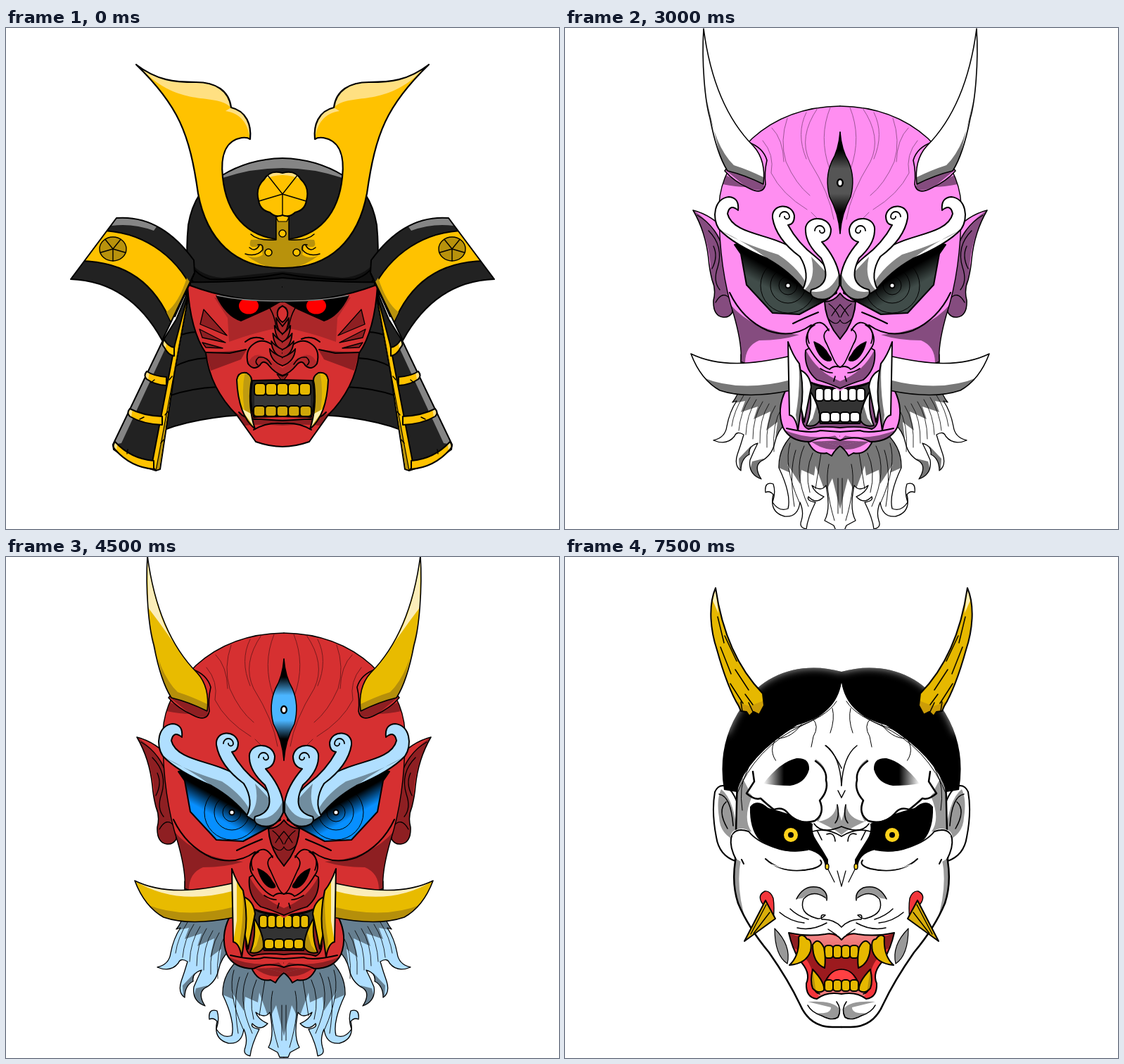
These frames come from a looping animation (786 by 712 pixels, 9 s). An HTML page:

```html
<!DOCTYPE html>
<html lang="en">
<head>
<meta charset="utf-8">
<title>Masks</title>
<style>
html, body { margin: 0; width: 100%; height: 100%; overflow: hidden; background: #fff; }
svg { display: block; width: 100vw; height: 100vh; }
.scene {
  opacity: 0; fill: none; stroke: #000; stroke-linejoin: round; stroke-linecap: round;
  animation: show 9s step-end infinite;
  animation-delay: calc(var(--i) * 1.5s - 9s);
}
@keyframes show { 0% { opacity: 1; } 16.66667%, 100% { opacity: 0; } }
</style>
</head>
<body>
<svg id="stage" viewBox="0 0 786 712"></svg>
<script>
const GOLD = '#ffc200', PALE = '#ffe082', BRONZE = '#b8920c', IRON = '#222', STEEL = '#858585';
const RED = '#d63031', WINE = '#8e1f22', TOOTH = '#e6b800';
let clips = 0;

// Drawing helpers: every left half is mirrored about x = 393, so halves stay open there.
const line = (d, w = 2, c = '#000') => `<path d="${d}" stroke="${c}" stroke-width="${w}"/>`;
const fill = (d, c) => `<path d="${d}" fill="${c}" stroke="none"/>`;
const solid = (d, c, w = 2) => `<path d="${d}" fill="${c}" stroke-width="${w}"/>`;
const oval = (x, y, rx, ry, c = 'none', w = 2) =>
  `<ellipse cx="${x}" cy="${y}" rx="${rx}" ry="${ry}" fill="${c}" stroke-width="${w}"/>`;
const move = (x, y, s) => `<g transform="translate(${x} ${y})">${s}</g>`;
const both = (...parts) => {
  const s = parts.join('');
  return s + `<g transform="matrix(-1 0 0 1 786 0)">${s}</g>`;
};
const shape = (d, c, inner, w = 2) => {
  const id = 'clip' + clips++;
  return `<clipPath id="${id}"><path d="${d}"/></clipPath>` + fill(d, c) +
    `<g clip-path="url(#${id})">${inner}</g>` + line(d, w);
};
const repeat = (n, draw) => Array.from({ length: n }, (_, i) => draw(i)).join('');
const teeth = (n, x, y, w, h, c) => repeat(n, i =>
  `<rect x="${x + i * w}" y="${y}" width="${w}" height="${h}" rx="4.5" fill="${c}" stroke-width="2"/>`);
const leaf = (x, y, deg, len, w) => `<g transform="translate(${x} ${y}) rotate(${deg})">` +
  solid(`M0 0Q${len * .3} ${-w} ${len} 0Q${len * .55} ${w} 0 0`, GOLD, 1.6) +
  fill(`M1 1Q${len * .5} ${w * .2} ${len} 0Q${len * .55} ${w} 1 1`, '#d59f08') + '</g>';
const spiral = (x, y, r, sweep = 1) => {
  const arc = (k, s) => `a${r * k} ${r * k} 0 0 ${sweep} ${2 * r * k * s} 0`;
  return line(`M${x} ${y}${arc(.35, 1)}${arc(.7, -1)}`, 1.8);
};
const spokes = (x, y, rx, ry, n, start) => line(repeat(n, i => {
  const a = (start + i * 360 / n) * Math.PI / 180;
  return `M${x} ${y}l${rx * Math.cos(a)} ${ry * Math.sin(a)}`;
}), 1.4);
const fade = (id, [x1, y1, x2, y2], ...stops) =>
  `<linearGradient id="${id}" gradientUnits="userSpaceOnUse" x1="${x1}" y1="${y1}" x2="${x2}" y2="${y2}">` +
  stops.map(([at, c]) => `<stop offset="${at}" stop-color="${c}"/>`).join('') + '</linearGradient>';

// Samurai parts
const bar = (x, y, w, h) => shape(
  `M${x} ${y}q-5 6 0 11q${w * .4} ${h * .9} ${w} ${h}v-12q${-w * .6} ${-h * .1} ${-w} ${1 - h}`, GOLD,
  fill(`M${x - 4} ${y}h8l-2 12h-6Z`, PALE));

const neckGuard = () => both(
  solid('M393 366H258L225 571Q290 547 393 549', IRON),
  line('M240 440Q256 432 272 432M236 483Q258 470 286 469M231 523Q262 512 302 510'),
  shape('M242 414L222 446L152 592L153 599Q180 620 213 629L262 366Z', IRON,
    fill('M222 446L152 592L164 590L229 450Z', STEEL)),
  solid('M262 366L240 450L207 622L213 629L219 627L241 480Z', GOLD),
  fill('M262 370L213 628L218 626L240 480Z', BRONZE),
  line('M262 368L213 629', 1.2),
  bar(225, 443, 14, 12), bar(200, 488, 28, 9), bar(176, 541, 46, 12), bar(155, 588, 55, 28),
  line('M206 504l5-4M190 556l6-3M172 605l1-6M232 500l4-5M226 550l4-5M220 590l4-5', 1.4));

const samuraiFace = () => both(
  shape('M393 366H258Q262 430 284 462Q290 512 328 550L355 588Q375 595 393 595', RED,
    fill('M296 383L393 380V425Q355 432 317 446L315 412Z', '#ab2729') +
    fill('M284 462L342 457L334 471L291 487Z', WINE) +
    fill('M324 545Q345 560 393 556V565Q350 562 336 566Z', WINE)),
  solid('M281 400L314 437L276 421ZM275 428L312 447L279 440ZM279 447L308 455L284 454Z', WINE, 1.3),
  line('M284 461L318 462L341 457M340 446Q352 436 366 442M331 546Q340 557 362 556L393 558M352 571Q370 560 393 562'),
  fill('M298 380Q312 410 334 417L372 400L393 388V380Z', '#000'),
  `<ellipse cx="345" cy="395" rx="14" ry="11.5" fill="red" stroke="none"/>`,
  line('M375 398Q382 410 384 425', 1.5),
  shape('M393 494Q382 490 374 480Q366 470 361 479Q352 488 344 477Q339 458 352 449Q364 440 378 450L393 462', RED,
    fill('M344 477Q350 462 362 465Q376 470 393 484V498H344Z', '#b3282b')),
  line('M358 479Q352 474 359 468Q370 466 377 478', 1.6),
  repeat(5, i => {
    const y = 418 + i * 11, w = 8 + i * 2.3;
    return solid(`M393 ${y + 18}Q${393 - w} ${y + 12} ${392 - w} ${y - 6}Q${397 - w} ${y + 1} 393 ${y + 6}`, '#ab2729', 1.8);
  }),
  solid('M393 395Q384 399 386 409Q388 415 393 418', RED),
  solid('M393 495L385 492L393 503', WINE, 1.2),
  solid('M393 500L350 501Q345 530 352 553L393 552', IRON),
  fill('M393 522H353V537H393Z', '#383838')) +
  teeth(5, 353, 505, 16, 17, TOOTH) + teeth(5, 352, 537, 16.4, 15, '#d0a608') +
  both(shape('M328 500Q330 488 342 490Q352 496 348 506Q344 540 354 570Q330 550 328 500', TOOTH,
    fill('M340 488Q356 496 349 508Q341 540 356 572L344 562Q332 525 340 488', '#bf9b10') +
    fill('M333 540L348 548L356 572Z', '#fff0b0')));

const hornedHelmet = () => both(
  shape('M393 185Q345 186 306 210Q268 228 259 280Q256 312 258 340Q262 360 272 368H393', IRON,
    fill('M393 185Q345 186 306 207L308 213Q350 199 393 199Z', STEEL) +
    fill('M258 325Q270 352 308 355Q350 350 393 346V370H250Z', '#111')),
  line('M258 326Q266 350 290 357Q340 359 393 349'),
  solid('M393 355Q320 362 262 361V366Q320 388 393 389', IRON),
  line('M300 380Q342 389 393 388', 1.5, STEEL),
  shape('M393 341C325 342 285 300 273 235C261 150 245 110 185 52C215 75 240 77 270 77C298 77 317 89 320 113C342 118 349 138 347 158Q343 155 335 156C310 160 305 185 308 212C313 262 340 298 393 301', GOLD,
    fill('M185 52C215 75 240 77 270 77C298 77 317 89 320 113C298 92 255 112 205 70ZM320 113C342 118 349 138 347 158C344 136 334 121 312 118Z', PALE) +
    fill('M340 322Q354 330 365 322L362 309Q342 316 348 301L372 300H393V342Q365 342 340 322Z', BRONZE), 2.2),
  line('M340 321Q356 326 365 315Q366 306 358 308M346 312Q354 319 360 309M348 293Q358 303 384 301V268', 1.5),
  oval(373, 319, 5, 5, GOLD, 1.5)) +
  fill('M384 304V268H402V304Z', BRONZE) + line('M384 301V268M402 301V268', 1.5) +
  solid('M384 269L393 265L402 269L399 275H387Z', GOLD, 1.2) + oval(393, 292, 5, 5, GOLD, 1.5) +
  shape('M393 206Q411 201 419 215Q432 227 427 245Q425 259 411 262Q403 270 393 266Q383 270 375 262Q361 259 359 245Q354 227 367 215Q375 201 393 206Z', GOLD,
    fill('M365 216Q393 202 421 216V200H365Z', PALE) + spokes(393, 236, 37, 34, 5, 90));

const bandedShoulders = () => both(
  shape('M92 357L157 270Q220 265 267 330L268 348L222 444Q176 360 92 357Z', IRON,
    fill('M157 270Q190 269 215 281L210 288Q180 277 150 281Z', STEEL) +
    solid('M132 288C190 288 240 320 266 374L236 422C212 362 170 332 106 331Z', GOLD) +
    fill('M262 362L236 420L228 404Q246 390 257 355Z', BRONZE)),
  line('M268 348L240 410'),
  oval(152, 314, 19, 17, BRONZE, 1.4), spokes(152, 314, 19, 17, 5, 90));

const laurel = () => {
  const at = (t, a, b, c, d) => {
    const u = 1 - t;
    return [u * u * u * a + 3 * u * u * t * b + 3 * u * t * t * c + t * t * t * d,
      u * u * (b - a) + 2 * u * t * (c - b) + t * t * (d - c)];
  };
  return repeat(12, i => {
    const t = .08 + i * .076;
    const [x, dx] = at(t, 345, 262, 268, 345), [y, dy] = at(t, 250, 220, 72, 42);
    const deg = Math.atan2(dy, dx) * 180 / Math.PI;
    return leaf(x, y, deg - 46, 59 - i * 2.7, 15 - i * .6) + leaf(x, y, deg + 46, 42 - i * 1.6, 10 - i * .3);
  }) + leaf(343, 43, -9, 33, 10) +
    line('M345 250C262 220 268 72 345 42', 7) + line('M345 250C262 220 268 72 345 42', 4, GOLD);
};

const crownedHelmet = () => both(
  shape('M393 205Q370 202 346 212Q296 238 274 262Q254 290 256 345L262 385H393', IRON,
    fill('M256 340Q280 370 320 368L393 362V390H250Z', '#111')),
  shape('M393 369Q275 371 258 395L300 397Q325 408 393 409', IRON,
    fill('M393 395Q360 397 333 403Q360 410 393 410Z', STEEL)),
  line('M257 296Q290 317 393 321', 8), line('M257 296Q290 317 393 321', 5, GOLD),
  shape('M302 333Q334 348 362 347L376 333V363H350Q312 360 302 333', GOLD,
    fill('M302 333Q334 348 362 347L376 333V348L350 353Q320 350 302 333', BRONZE) +
    fill('M318 352Q340 360 376 357V362H345Z', PALE))) +
  solid('M384 321H402V364H384Z', BRONZE) + repeat(3, i => oval(393, 326 + i * 14, 4.5, 4.5, GOLD, 1.5)) +
  both([175, 165, 153, 140, 125, 108, 90].map((a, i) =>
    leaf(393, 247, a, [130, 118, 108, 91, 76, 65, 64][i], 16)).join(''), laurel()) +
  solid('M363 212Q376 201 393 189Q410 201 423 212L410 222H376Z', PALE) +
  `<circle cx="393" cy="182" r="37.5" stroke-width="15"/><circle cx="393" cy="182" r="37.5" stroke="${GOLD}" stroke-width="11"/>` +
  line('M358 166Q370 142 398 143', 2, PALE) +
  both(shape('M393 233Q380 226 371 236Q364 221 349 227Q335 233 339 247Q323 250 323 264Q326 276 340 276Q347 292 393 292', GOLD,
    fill('M335 272Q360 284 393 283V294H340Z', '#d59f08')),
  spiral(350, 240, 12), spiral(337, 262, 12), spiral(382, 244, 13, 0),
  line('M347 258Q365 246 371 236M348 270Q365 254 393 262'));

const plainShoulders = () => both(
  shape('M127 323Q165 300 200 295Q245 307 268 346V356L250 395Q234 434 216 463Q190 408 140 388Z', IRON,
    fill('M127 323Q165 300 200 295Q216 299 232 308L196 308Q160 311 127 323Z', STEEL) +
    fill('M268 350L216 463L212 454Q245 405 256 348Z', '#111')),
  line('M128 323Q165 307 198 309Q236 315 267 350', 1.5),
  oval(196, 363, 33, 35, '#cda410', 1.5), line('M197 363L164 366M197 363L213 333M197 363L213 394', 1.5));

// Bearded demon
const oni = p => {
  const hair = (d, shade) => shape(d, p.hair, fill(shade, p.hairShade), 1.3);
  const brow = (d, shade) => shape(d, p.brow, fill(shade, p.browShade));
  return fade(p.id + 'Eye', [320, 346, 302, 378], [0, '#000'], [.25, '#000'], [.95, p.eye]) +
    fade(p.id + 'Third', [0, 165, 0, 270], [.08, '#000'], [.33, p.third], [.67, p.third], [.92, '#000']) +
    both(
      shape('M184 259Q212 266 234 292L240 404Q235 412 227 411Q212 409 213 387Q217 372 211 358Q207 342 206 328Q202 290 184 259Z', p.shade,
        fill('M184 259Q212 266 234 292L238 345Q230 310 217 290Q204 272 184 259Z', p.skin) +
        fill('M184 259Q208 300 209 345L200 300Z', p.skin), 1.5),
      line('M190 266Q218 282 228 318L237 385Q226 372 216 390M206 288Q228 310 219 340Q212 360 222 372M213 310Q220 325 211 342', 1.3),
      hair('M252 464L261 477L267 462L278 480L325 506L316 562Q304 572 300 590Q296 608 280 616Q270 624 281 641Q262 634 265 614Q270 602 276 590Q262 594 264 606Q252 612 252 629Q242 622 247 606Q252 592 256 578Q246 572 243 580Q232 594 213 586Q230 582 232 566Q236 545 246 530L240 532Q250 520 252 500Z',
        'M250 460L330 500L318 566L300 590L304 560L288 572L294 545L270 556L276 538L252 546L258 530L238 534ZM250 629L249 612L266 594L264 608ZM281 641L264 632L268 616L284 612Z'),
      line(repeat(7, i => `M${256 + i * 9} ${522 + i * 3}q-14 22 ${-17 + i} ${44 + i * 3}`), .8),
      shape('M393 111Q318 112 268 157Q224 200 221 250Q220 340 242 408Q254 450 252 474L315 505L325 572L393 604', p.skin,
        fill('M221 204Q250 222 286 220Q270 231 226 222ZM236 392Q270 432 335 436Q310 444 278 444Q258 452 258 476L250 476Z', p.shade), 1.4),
      line('M379 113Q362 155 378 200Q394 240 387 258M361 114Q333 155 350 190Q378 235 384 272M345 120Q330 150 345 186M318 128Q307 160 316 190Q330 222 350 238M296 142Q312 158 313 190M283 160Q300 180 295 206Q310 236 346 258M352 262L374 284', 1, p.vein),
      line('M236 376Q254 414 290 430Q325 442 352 422M326 420Q342 412 362 404', 2),
      shape('M229 203Q242 218 264 228Q284 238 287 222Q285 205 289 188Q284 170 262 162Z', p.skin,
        fill('M229 201L284 219L286 232L262 228Z', p.shade), 1.6),
      shape('M199 1C196 50 201 104 208 128Q218 180 233 203Q258 209 284 222Q288 188 270 168C230 128 208 70 199 1Z', p.horn,
        fill('M199 1C206 60 222 105 240 130L215 95L200 75Z', p.glint) +
        fill('M203 100Q214 168 242 195Q264 202 288 214V226L228 206Z', p.hornShade), 1.6),
      shape('M243 308L252 321L260 365L297 405L335 407L378 384L350 350L255 305Z', `url(#${p.id}Eye)`,
        [13, 25, 39].map(r => oval(319, 366, r, r, 'none', 1)).join('')),
      `<circle cx="319" cy="366" r="3.5" fill="#fff" stroke-width="2"/>`,
      brow('M248 259Q250 241 235 240C214 242 210 270 221 286Q242 308 290 328Q322 346 342 372L352 372Q352 335 322 311C294 293 240 293 233 264Q236 249 248 259Z',
        'M222 287Q250 305 305 322Q340 345 350 375L335 373Q300 325 222 287Z'),
      brow('M297 270C295 249 325 248 328 267Q328 279 319 280Q333 306 358 325Q382 344 388 377Q366 390 340 371Q351 350 336 325Q302 300 297 270Z',
        'M340 374Q360 358 352 325L385 360V390Z'),
      brow('M344 289C341 267 376 264 380 286Q380 301 367 304Q388 328 392 352V366Q382 390 361 385Q348 381 352 372Q384 364 366 327Q345 308 344 289Z',
        'M350 374Q378 380 391 350V382Q370 392 350 382Z'),
      spiral(314, 268, 10, 0), spiral(364, 288, 10, 0)) +
    both(
      fill('M393 148Q391 173 381 190Q371 213 378 240Q391 264 393 292Z', `url(#${p.id}Third)`),
      line('M393 148Q391 173 381 190Q371 213 378 240Q391 264 393 292', 1.5),
      solid('M393 377Q384 389 371 389Q372 410 384 430L393 442', p.shade),
      line('M377 392Q386 398 392 411M381 409Q388 398 393 393M377 414Q388 425 393 415', 1.2),
      hair('M393 580L332 572Q305 594 306 625Q324 663 319 683Q306 688 297 674Q302 660 298 648Q285 644 287 660Q293 657 298 663Q292 688 314 694Q333 696 336 674Q342 688 338 700Q334 710 345 712Q347 696 358 674Q345 672 348 666Q359 678 370 666Q356 660 353 650Q366 660 373 650Q380 684 371 700L384 707L387 714H393',
        'M328 572L310 582L306 625L322 632L318 620L336 648L338 628L356 636L358 622L372 660L382 640L393 684V580Z'),
      line('M322 590Q312 622 335 674M342 594Q325 630 348 680M366 604L358 655M377 620Q370 650 385 700M390 640V690M330 600Q320 630 328 680M354 604Q342 630 350 660', .9),
      shape('M345 582Q354 608 374 604L381 608Q386 599 393 594', p.skin, fill('M345 582L393 588V598Q368 603 345 582Z', p.shade)),
      fill('M345 582L393 594V578Z', p.shade),
      fill('M316 514L312 568L350 588L393 586V510Z', p.skin),
      shape('M316 514Q302 542 312 568Q322 588 350 588Q370 578 393 586', p.skin,
        fill('M310 570Q352 588 393 578V590L335 594Z', p.shade)),
      solid('M393 512Q346 508 336 492L340 540Q336 566 348 570Q364 565 393 568', p.shade),
      solid('M393 512Q370 514 347 502L352 530L365 562H393', '#333'),
      line('M317 569Q352 577 365 572L393 574')) +
    teeth(6, 358, 512, 11.7, 18, p.horn) + teeth(4, 365, 546, 14, 14, p.horn) +
    both(
      shape('M350 515Q365 540 364 558Q358 568 345 565Q354 544 350 515Z', p.horn, fill('M360 535L365 565L344 568L354 555Z', p.hornShade)),
      solid('M336 486Q350 492 352 510L342 560L333 520Z', p.horn),
      shape('M181 463C222 483 270 478 323 466V515Q260 528 222 515Q195 500 181 463Z', p.horn,
        fill('M181 463C222 483 270 478 323 466V477Q240 500 181 463Z', p.glint) +
        fill('M196 496Q250 519 323 500V522H220Z', p.hornShade), 1.6),
      shape('M319 446Q326 466 335 477Q341 505 339 530L333 572Q330 552 321 550Z', p.horn,
        fill('M319 446L326 462V520L321 550Z', p.glint) + fill('M334 475Q345 520 333 572L330 550Q337 510 334 475Z', p.hornShade)),
      fill('M393 448Q380 443 377 430Q366 410 351 425Q340 443 344 458Q341 484 360 500Q374 504 393 516Z', p.skin),
      fill('M344 457Q360 489 393 502V514Q374 504 360 500Q341 484 344 457Z', p.shade),
      line('M377 430Q366 410 351 425Q340 443 349 455L344 458Q341 484 360 500Q374 504 393 512M349 455Q364 480 378 485Q384 479 393 482', 1.8),
      solid('M356 446Q371 452 377 465Q385 474 375 473Q362 469 356 446Z', '#000', 1.5),
      line('M377 428Q365 434 374 449L384 471Q388 480 393 482M349 448Q342 430 357 422M365 484Q374 490 382 490M386 495L384 502', 1.7)) +
    `<ellipse cx="393" cy="220" rx="3.8" ry="5" fill="#fff" stroke-width="2.5"/>`;
};

// Horned mask with parted hair
const hannya = p => fade(p.id + 'Gum', [0, 535, 0, 570], [0, '#f58a8a'], [1, '#e35b5f']) +
  `<linearGradient id="${p.id}Brow"><stop stop-color="${p.skin}"/><stop offset=".45" stop-color="#000"/></linearGradient>
  <filter id="${p.id}Soft" x="-20%" y="-30%" width="140%" height="160%"><feGaussianBlur stdDeviation="6"/></filter>` +
  both(
    shape('M242 432Q219 424 215 398Q208 362 213 334Q218 322 230 326Q246 340 250 372Z', p.skin,
      fill('M222 330Q242 345 246 405Q220 395 219 370Q215 345 222 330Z', p.shade)),
    line('M219 337Q236 340 239 382M229 348Q216 360 231 386', 1.5),
    shape('M393 178Q300 200 245 310L242 432Q237 465 246 492Q260 526 290 562Q318 602 334 636Q348 668 380 668H393', p.skin,
      fill('M245 300L266 340Q252 372 265 390L236 400ZM236 430H250Q242 470 258 520L236 500ZM298 528Q322 552 316 578Q298 566 298 528ZM345 632Q380 630 389 641Q393 652 387 656Q374 657 357 648Q378 650 378 640Z', p.shade), 2.5),
    shape('M393 163C340 148 282 163 252 212Q215 265 226 331L244 334Q258 284 330 239Q386 224 393 178', '#000',
      `<path d="M393 158C340 143 279 158 248 208Q236 226 228 246" stroke="#aaa" stroke-width="11" filter="url(#${p.id}Soft)"/>`, 0),
    line('M391 184Q382 220 338 239Q270 270 243 340M386 205Q372 228 322 244Q288 256 266 286M290 258Q268 278 258 306Q247 325 252 360M308 248Q286 270 300 290Q301 304 290 312M352 230Q362 240 353 255L350 270M380 215Q384 230 377 250M244 306Q256 290 270 284M336 238Q318 262 294 257', 1),
    line('M371 268Q391 283 393 325M393 300Q405 276 416 268M388 332L393 342', 1.5),
    fill('M356 287Q374 298 371 318Q375 336 363 345Q370 360 360 376L352 372Q360 345 356 340Q371 318 356 300ZM360 376Q384 372 386 352L393 375V395Q386 388 360 376Z', p.shade),
    fill('M263 355Q272 342 290 357Q322 365 352 379Q350 392 357 402Q366 416 374 430V440L370 443Q370 422 345 416Q312 425 276 402Q262 386 263 355Z', '#000'),
    fill('M267 305L260 334Q276 346 288 356L315 362Q332 380 355 375Q370 365 362 346Q375 332 371 317Q373 302 356 290L320 280Z', p.skin),
    line('M267 305L269 319L258 336Q270 346 278 343Q290 354 297 359Q308 355 315 362Q332 382 355 375Q370 365 362 346Q375 332 371 317Q373 302 356 290', 2.5),
    fill('M282 322Q306 291 329 286Q348 285 347 302Q341 322 320 325Q299 325 282 322Z', `url(#${p.id}Brow)`),
    `<circle cx="321" cy="395" r="7" stroke="#ffd21c" stroke-width="6"/>`,
    oval(372.5, 440, 2.5, 4, '#ffd21c', 1.4),
    line('M354 379Q365 395 393 383M352 390Q372 384 393 397M387 352Q391 370 384 378M359 390L365 402M372 394Q383 390 384 404', 1.6),
    fill('M236 404Q232 386 253 386Q266 388 271 402Q293 416 318 421Q354 426 369 438L367 450Q300 450 248 432Q238 426 236 404Z', p.skin),
    line('M243 430Q234 412 236 400Q240 383 261 390Q272 404 296 412Q320 421 345 416M285 429Q310 452 352 443Q369 438 363 431M251 430L254 436', 2),
    line('M239 396Q246 388 259 393', 2.5, p.gleam), line('M294 437Q320 447 342 443', 1.2, p.gleam),
    line('M374 444L383 462M387 446L393 468', 1.2),
    fill('M329 486Q340 464 362 470Q374 476 372 488Q360 471 337 485Z', p.shade),
    line('M329 486Q340 464 362 470Q374 476 372 488M370 484Q352 472 339 486Q332 506 356 513Q363 516 370 509Q362 507 365 515Q382 514 393 526M305 505Q320 518 340 520M320 500Q330 510 346 515M330 527Q350 532 372 520M374 529L386 537', 1.5),
    solid('M296 516Q298 498 296 485Q292 474 284 475Q274 480 279 490Z', p.wart, 1.4),
    shape('M285 488L299 514L255 546Z', '#d9ae0a', line('M286 494L264 536M291 505L268 535', 1.4) + fill('M285 488L255 546L271 505Z', BRONZE)),
    shape('M393 621Q372 617 358 628Q342 626 343 606Q350 590 333 573Q323 556 318 534Q345 540 370 536Q384 533 393 544', p.lip,
      fill('M326 538Q364 544 393 548V606L352 606Q354 580 337 566Z', '#9c1a1e') +
      fill('M340 537Q378 532 393 543V562L355 562Z', `url(#${p.id}Gum)`) +
      fill('M374 600Q380 586 393 586V605H372Z', '#ff4043') +
      fill('M318 534L332 540L334 560L326 556Z', WINE) +
      fill('M356 617L393 612V623L362 626Z', '#f07c7c')),
    line('M371 601Q379 586 393 586M356 593Q349 618 362 621M345 637Q350 647 365 652Q380 660 388 654Q394 643 386 632', 1.6),
    line('M298 528Q322 552 316 578Q298 566 298 528', 1.2)) +
  teeth(4, 369, 552, 12, 18, TOOTH) + teeth(4, 369, 601, 12, 16, TOOTH) +
  both(
    solid('M332 540Q338 534 344 543Q352 543 349 560Q343 578 319 580Q334 566 332 540Z', TOOTH),
    solid('M352 551Q360 539 368 555Q371 570 369 584Q352 577 352 551Z', TOOTH),
    shape('M352 586Q370 605 368 616Q360 622 352 613Q348 603 352 586Z', TOOTH, fill('M352 586L357 620H348Z', BRONZE)),
    shape('M214 44C203 70 207 105 216 132Q231 186 247 212L250 219L258 220L262 226L268 220L276 224L283 211L281 194Q228 140 214 44Z', TOOTH,
      fill('M214 44L210 62L218 80Z', '#fff1b8') + fill('M245 206L262 212L283 204V228H245Z', '#cc9d08') +
      line('M217 85L226 122M227 112L244 148M221 128L236 166M242 160L261 189M235 180L253 208M256 195L267 210M252 219L250 206M268 222L261 207', 1.5)));

const pink = { id: 'pink', skin: '#ff8ef1', shade: '#854c7f', vein: '#9d5695', horn: '#fff', glint: '#fff', hornShade: '#777',
  hair: '#fff', hairShade: '#777', brow: '#fff', browShade: '#858585', eye: '#404c49', third: '#555' };
const blue = { id: 'blue', skin: RED, shade: WINE, vein: '#781b1d', horn: '#e8bb00', glint: '#fbedba', hornShade: '#b58f0b',
  hair: '#b0dfff', hairShade: '#667f90', brow: '#b0dfff', browShade: '#718d9f', eye: '#078fff', third: '#4bb5ff' };
const crimson = { id: 'crimson', skin: RED, shade: WINE, gleam: '#f28a8a', wart: '#ef393b', lip: '#dd3436' };
const white = { id: 'white', skin: '#fff', shade: '#999', gleam: '#fff', wart: '#f4363b', lip: '#f4363b' };

const scenes = [
  neckGuard() + samuraiFace() + hornedHelmet() + bandedShoulders(),
  move(0, 19, neckGuard() + samuraiFace()) + crownedHelmet() + plainShoulders(),
  move(-2, 0, oni(pink)),
  move(2, -3, oni(blue)),
  hannya(crimson),
  hannya(white)
];
document.getElementById('stage').innerHTML =
  scenes.map((s, i) => `<g class="scene" style="--i:${i}">${s}</g>`).join('');
</script>
</body>
</html>
```
